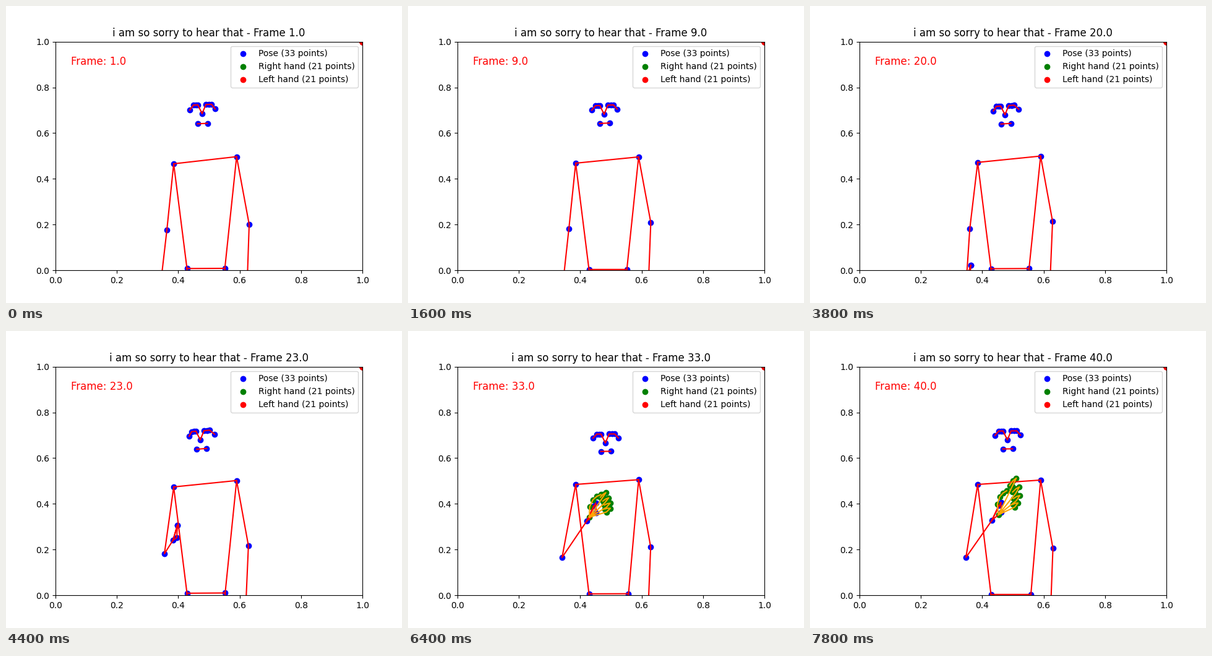
Recreate the animation shown at these times as a matplotlib script. Size 640x480 px, loop 8000 ms.

```python
import numpy as np
import matplotlib.pyplot as plt
from matplotlib.animation import FuncAnimation

FRAMES, INTERVAL = 40, 200
HAND_START = 24

# Motion keys in stage pixels (y down); the first column is the count.
HEAD = [  # nose x, nose y, yaw, roll, pitch
    (1, 317, 174, 0, 0.045, 1.5), (9, 317, 175, 0, 0.045, 0),
    (15, 317, 175.3, 0, 0.045, 0), (23, 314, 176, 2, 0.08, 0),
    (28, 313, 177, 1.5, 0.13, 0.5), (33, 319, 181, 0, 0.01, -1),
    (40, 319, 176, 0, 0.01, 0)]
TORSO = [  # shoulder lift, hip rise, left elbow bend, hip sway
    (1, 0, 1.5, 0, 0), (9, 1, 0, 3, 0), (15, 1, 0, 3, 0),
    (23, 3, 2, 6, 0.5), (28, 6, 3, 6.5, 0.3), (33, 7, 1, 4, 2.7),
    (40, 7, 0, 2, 3.3)]
ARM = [  # right elbow x, y, right wrist x, y
    (1, 260, 362, 246.4, 480), (9, 260, 360, 247, 480),
    (19, 259, 360, 247, 478), (23, 256, 360, 270, 338),
    (28, 248, 361, 283, 304), (33, 249, 366, 289, 307),
    (40, 252, 366, 294, 306)]
GRIP = [  # little finger, index finger and thumb, relative to the wrist
    (23, 6, -4, 7, -24, 7, -24), (28, 15, -13, 14.5, -29, 11, -24)]
FIST = [  # shift from the wrist x, y, index angle, index reach
    (28, 7, -12, 53, 46), (33, 4, -6, 56, 48), (40, 10.5, -9, 64, 66)]

# Joint numbers: face 0-10, body 11-17, right arm 18-21, knees 22-23
POSE_CHAINS = [range(9), (9, 10), (11, 12, 16, 15, 11), (11, 13, 18),
               (12, 14, 17), (18, 19, 20, 18), (18, 21), (15, 22), (16, 23)]
HAND_CHAINS = [(0, *range(k, k + 4)) for k in range(1, 21, 4)]


def track(keys, n):
    """Values of a motion table at count n, blended linearly."""
    times, *columns = np.array(keys, float).T
    return np.array([np.interp(n, times, c) for c in columns])


def to_data(pts):
    return np.column_stack([(pts[:, 0] - 80) / 496,
                            (427.2 - pts[:, 1]) / 369.6])


def face(n):
    x, y, yaw, roll, pitch = track(HEAD, n)
    fx = np.array([-20, -14, -10.5, -7, 0, 6, 10.5, 15, 21, -7.5, 8.5])
    fy = np.array([-7.5, *[-14.5] * 3, 0, *[-14.5] * 3, -7.5, 14.5, 14.5])
    ears, mouth = abs(fx) > 19, fy > 0
    px = x + fx + yaw * (ears + 0.8 * mouth)
    py = y + fy - roll * fx + pitch * (0.5 * ears + mouth)
    return np.column_stack([px, py])


def body_points(n):
    lift, rise, bend, sway = track(TORSO, n)
    arm = track(ARM, n).reshape(2, 2)
    elbow, wrist = arm
    hips = np.array([(292.5, 425.8 - rise),
                     (353.7 + sway, 425.8 - 1.2 * rise)])
    shoulders = [(271, 255 - lift),
                 (372.7, 244.4 - 0.5 * lift - 0.6 * rise)]
    left_arm = [(393 - 0.2 * bend, 353 - bend), (388.7 - 0.45 * bend, 480)]
    grip = wrist + track(GRIP, n).reshape(3, 2)
    return to_data(np.vstack([face(n), shoulders, elbow, left_arm[0], hips,
                              left_arm[1], wrist, grip, hips + (0, 180)]))


def hand_points(n):
    """A fan of bent fingers, laid out by angle and distance from the wrist."""
    if n < HAND_START:
        return np.ones((21, 2))
    dx, dy, angle, reach = track(FIST, n)
    wrist = track(ARM, n)[2:] + (dx, dy)
    polar = [(0, 0)]
    polar += [(angle + 32 - a, r)
              for a, r in zip((0, 10, 18, 25), (17, 29, 36, 41))]
    for k in range(4):
        a = angle - 11 * k
        r = reach + (37 - reach) * k / 3
        polar += [(a - 2 * k, 0.78 * r), (a, r),
                  (a + 3, 0.9 * r), (a + 5, 0.77 * r)]
    a, r = np.array(polar).T
    a = np.radians(a)
    return to_data(wrist + np.column_stack([r * np.cos(a), -r * np.sin(a)]))


def set_chains(line, pts, chains):
    gap = [[np.nan, np.nan]]
    path = np.vstack([np.vstack([pts[list(c)], gap]) for c in chains])
    line.set_data(path[:, 0], path[:, 1])


fig, ax = plt.subplots(figsize=(6.4, 4.8), dpi=100)
ax.set_xlim(0, 1)
ax.set_ylim(0, 1)
corner = np.ones(21)
pose_dots = ax.scatter(corner, corner, c="blue", label="Pose (33 points)")
right_dots = ax.scatter(corner, corner, c="green", label="Right hand (21 points)")
left_dots = ax.scatter(corner, corner, c="red", label="Left hand (21 points)")
pose_line, = ax.plot([], [], color="red", lw=1.5)
hand_line, = ax.plot([], [], color="orange", lw=1.5)
counter = ax.text(0.05, 0.9, "", fontsize=12, color="red")
title = ax.set_title("")
ax.legend(loc="upper right")


def draw(i):
    n = i + 1
    pose, hand = body_points(n), hand_points(n)
    pose_dots.set_offsets(pose)
    right_dots.set_offsets(hand)
    set_chains(pose_line, pose, POSE_CHAINS)
    set_chains(hand_line, hand, HAND_CHAINS)
    counter.set_text(f"Frame: {n:.1f}")
    title.set_text(f"i am so sorry to hear that - Frame {n:.1f}")
    return pose_dots, right_dots, pose_line, hand_line, counter, title


anim = FuncAnimation(fig, draw, frames=FRAMES, interval=INTERVAL,
                     repeat=True, repeat_delay=0, blit=False)
plt.show()
```
